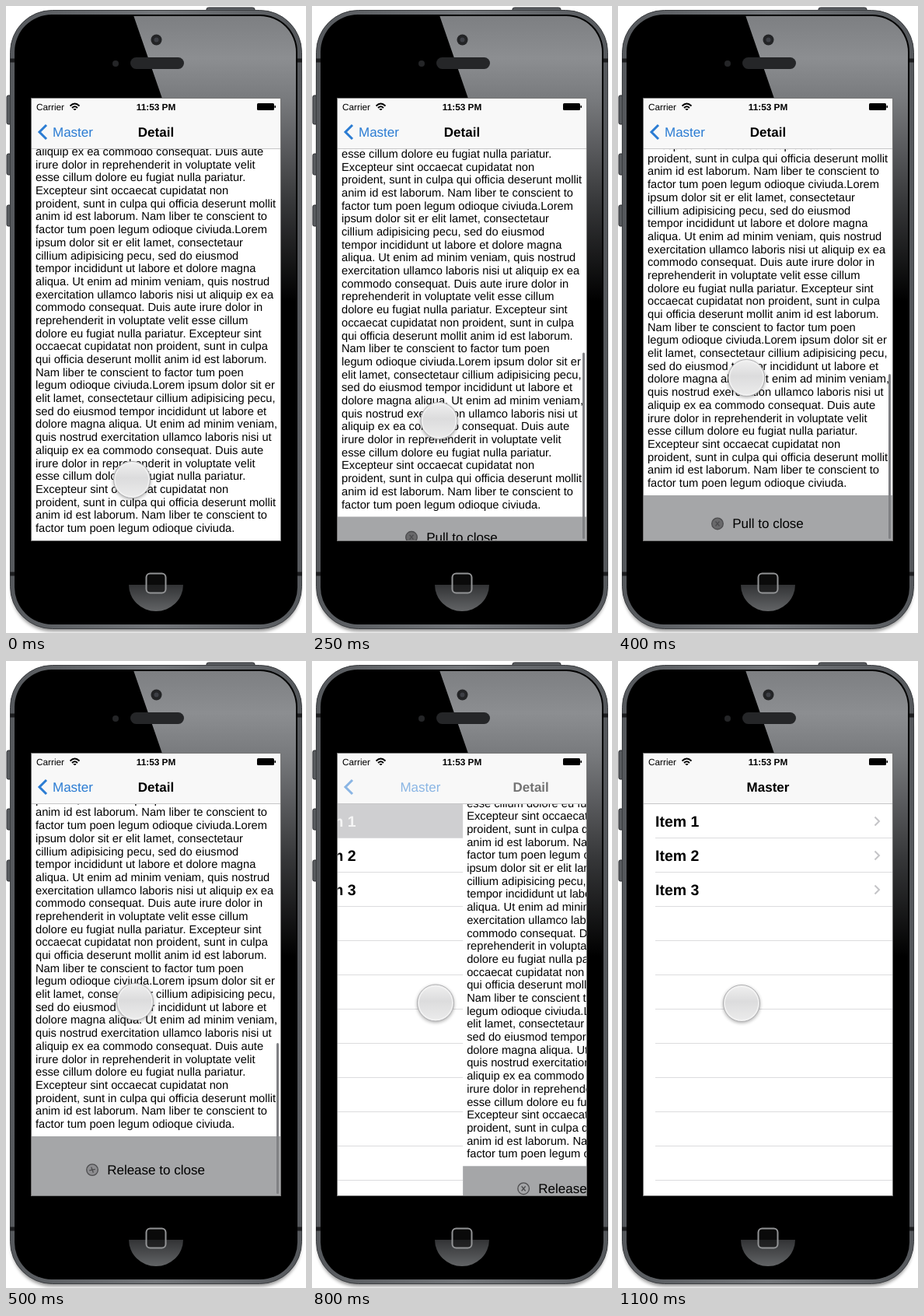
An HTML page that plays this animation: 386x806 px, repeating every 1.6 s.

```html
<!DOCTYPE html>
<html lang="en">
<head>
<meta charset="utf-8">
<title>Pull to close</title>
<style>
  html, body { margin: 0; width: 100%; height: 100%; overflow: hidden; background: #fff; }
  svg { display: block; width: 386px; height: 806px; }
  text { font: 17px "Liberation Sans", Arial, sans-serif; fill: #000; text-rendering: geometricPrecision; }
  .bold { font-weight: bold; }
  .status { font-size: 11.8px; }
  #lines text { font-size: 14.7px; }
  .mid { text-anchor: middle; }
  #rows text { font-size: 19.5px; font-weight: bold; }
  #back text { fill: #2b7cd3; }
</style>
</head>
<body>
<svg viewBox="0 0 386 806">
  <defs>
    <linearGradient id="rim" x1="0" x2="1" y1="0" y2="0">
      <stop offset="0" stop-color="#55585c"/><stop offset=".5" stop-color="#74777b"/><stop offset="1" stop-color="#55585c"/>
    </linearGradient>
    <linearGradient id="gloss" gradientUnits="userSpaceOnUse" x1="0" x2="0" y1="12" y2="380">
      <stop offset="0" stop-color="#7d7f82"/><stop offset=".15" stop-color="#8c8e91"/>
      <stop offset=".3" stop-color="#77797c"/><stop offset=".65" stop-color="#37383a"/><stop offset="1" stop-color="#000"/>
    </linearGradient>
    <linearGradient id="home" x1="0" x2="0" y1="0" y2="1">
      <stop offset="0" stop-color="#323335"/><stop offset="1" stop-color="#626466"/>
    </linearGradient>
    <linearGradient id="disc" x1="0" x2="0" y1="0" y2="1">
      <stop offset="0" stop-color="#f0f0f0"/><stop offset=".45" stop-color="#dcdcdd"/><stop offset="1" stop-color="#ececec"/>
    </linearGradient>
    <filter id="soft" x="-20%" y="-20%" width="140%" height="140%"><feGaussianBlur stdDeviation="2"/></filter>
    <clipPath id="face"><rect x="13" y="13" width="360" height="780" rx="46"/></clipPath>
    <clipPath id="screen"><rect x="33" y="119" width="320" height="568"/></clipPath>
  </defs>

  <!-- phone -->
  <g fill="#5b5e62" stroke="#2c2d30">
    <path d="M258 8V4q0-2 3-2h56q3 0 3 2v4z"/>
    <rect x="1" y="115" width="7" height="37" rx="2"/>
    <rect x="1" y="190" width="7" height="27" rx="2"/>
    <rect x="1" y="256" width="7" height="27" rx="2"/>
  </g>
  <rect x="7" y="40" width="372" height="764" rx="53" opacity=".4" filter="url(#soft)"/>
  <rect x="5.500" y="5.500" width="375" height="795" rx="54" fill="url(#rim)" stroke="#3b3d40"/>
  <path d="M5 70h7M374 70h7M5 730h7M374 730h7" stroke="#1c1d1f" stroke-width="5"/>
  <rect x="11" y="11" width="364" height="784" rx="48"/>
  <path clip-path="url(#face)" d="M164 12L201 119H353V400H374V12Z" fill="url(#gloss)"/>
  <circle cx="193.500" cy="43.500" r="7" fill="#232426"/>
  <circle cx="193.500" cy="43.500" r="3" fill="#3d3f45"/>
  <circle cx="141" cy="74" r="4" fill="#242527"/>
  <rect x="160" y="66" width="69" height="15" rx="7.500" fill="#252628"/>
  <path d="M158 744A35 34 0 0 0 228 744Z" fill="url(#home)"/>
  <rect x="180.500" y="729.500" width="25" height="25" rx="5" fill="#111" fill-opacity=".6" stroke="#929395" stroke-width="2"/>
  <rect x="32" y="118" width="322" height="570" fill="#777"/>

  <g clip-path="url(#screen)">
    <rect x="33" y="119" width="320" height="568" fill="#fff"/>
    <g id="master">
      <rect id="selected" x="33" y="184" width="320" height="43" fill="#cfcfd1"/>
      <g id="rows"></g>
    </g>
    <g id="detail">
      <rect x="33" y="119" width="320" height="568" fill="#fff"/>
      <g id="lines"></g>
      <rect id="band" x="33" width="320" height="80" fill="#a5a6a8"/>
      <g id="pull">
        <text id="label" class="mid" x="193" y="6"></text>
        <g id="icon" fill="none" stroke="#4b4b4d" stroke-width="1.300">
          <circle id="dot" r="7.300" fill="#69696b"/>
          <path id="cross" d="M-2.500-3L2.500 3M2.500-3L-2.500 3"/>
        </g>
      </g>
      <rect id="bar" x="348" width="3" rx="1.500" fill="#808184"/>
    </g>

    <!-- navigation and status bars -->
    <rect x="33" y="119" width="320" height="64" fill="#f8f8f8"/>
    <path d="M33 183.500H353" stroke="#c6c6c8"/>
    <g id="back">
      <path d="M52 153L43 162L52 171" fill="none" stroke="#2b7cd3" stroke-width="3"/>
      <text id="backLabel" x="60" y="168">Master</text>
    </g>
    <text id="detailTitle" class="bold mid" y="168">Detail</text>
    <text id="masterTitle" class="bold mid" y="168">Master</text>
    <text class="status" x="39" y="134">Carrier</text>
    <text class="status bold mid" x="193" y="134">11:53 PM</text>
    <g fill="none" stroke="#000" stroke-width="1.800">
      <path d="M82.500 128.500Q88.500 122.500 94.500 128.500M85 131Q88.500 127.500 92 131"/>
      <path d="M87 132.500h3L88.500 134z" fill="#000" stroke-width="1"/>
    </g>
    <rect x="323" y="125" width="22" height="9" rx="1.500"/>
    <rect x="345.500" y="128" width="1.500" height="3"/>
  </g>

  <g id="knob">
    <circle cy="1.500" r="24" opacity=".3" filter="url(#soft)"/>
    <circle r="23.500" fill="url(#disc)" stroke="#b0b0b2"/>
    <circle r="21.800" fill="none" stroke="#f6f6f6" stroke-opacity=".8" stroke-width="1.500"/>
  </g>
</svg>

<script>
const $ = id => document.getElementById(id);
const set = (id, attrs) => { for (const k in attrs) $(id).setAttribute(k, attrs[k]); };
const move = (id, x, y) => set(id, { transform: `translate(${x} ${y})` });
const clamp = v => Math.max(0, Math.min(1, v));

// Linear interpolation through [time, value] pairs
function track(t, ...keys) {
  const i = keys.findIndex(k => k[0] > t);
  if (i < 0) return keys[keys.length - 1][1];
  if (i === 0) return keys[0][1];
  const [t0, a] = keys[i - 1], [t1, b] = keys[i];
  return a + (b - a) * (t - t0) / (t1 - t0);
}

const copy = `aliquip ex ea commodo consequat. Duis aute
irure dolor in reprehenderit in voluptate velit
esse cillum dolore eu fugiat nulla pariatur.
Excepteur sint occaecat cupidatat non
proident, sunt in culpa qui officia deserunt mollit
anim id est laborum. Nam liber te conscient to
factor tum poen legum odioque civiuda.Lorem
ipsum dolor sit er elit lamet, consectetaur
cillium adipisicing pecu, sed do eiusmod
tempor incididunt ut labore et dolore magna
aliqua. Ut enim ad minim veniam, quis nostrud
exercitation ullamco laboris nisi ut aliquip ex ea
commodo consequat. Duis aute irure dolor in
reprehenderit in voluptate velit esse cillum
dolore eu fugiat nulla pariatur. Excepteur sint
occaecat cupidatat non proident, sunt in culpa
qui officia deserunt mollit anim id est laborum.
Nam liber te conscient to factor tum poen
legum odioque civiuda.Lorem ipsum dolor sit er
elit lamet, consectetaur cillium adipisicing pecu,
sed do eiusmod tempor incididunt ut labore et
dolore magna aliqua. Ut enim ad minim veniam,
quis nostrud exercitation ullamco laboris nisi ut`.split("\n");
const ending = [...copy.slice(0, 6), "factor tum poen legum odioque civiuda."];
$("lines").innerHTML = [...copy, ...ending]
  .map((s, i) => `<text x="38" y="${192 + i * 16.69}">${s}</text>`).join("");

for (let i = 0; i < 11; i++) {
  const y = 227.5 + i * 44;
  $("rows").innerHTML += `<path d="M48 ${y}H353" stroke="#dcdcde"/>` + (i < 3
    ? `<text x="48" y="${y - 15}">Item ${i + 1}</text>
       <path d="M330.500 ${y - 27}l5.500 5.500l-5.500 5.500" fill="none" stroke="#c4c4c7" stroke-width="2"/>` : "");
}
const firstItem = $("rows").querySelector("text");

function draw(t) {
  // Critically damped spring drives both the slide and the scroll's return
  const k = Math.max(0, t - 700) * 0.0169;
  const slide = t >= 1100 ? 1 : 1 - (1 + k) * Math.exp(-k);
  const scroll = track(t, [0, 0], [50, 2], [150, 12], [350, 49], [500, 76]) * (1 - slide);

  move("knob", track(t, [150, 162], [350, 165], [500, 166], [600, 166], [700, 159]),
    track(t, [0, 609], [50, 597], [150, 568], [350, 498], [500, 438], [600, 438], [700, 439], [900, 440]));

  move("detail", 320 * slide, 0);
  move("lines", 0, -scroll);
  set("band", { y: 687 - scroll });
  set("bar", { y: 415 + scroll, height: 270 - scroll, opacity: clamp(t / 100) });

  const ready = t >= 450;
  $("label").textContent = ready ? "Release to close" : "Pull to close";
  move("pull", 0, 702 - 0.63 * scroll);
  move("icon", ready ? 111 : 128, 0);
  set("dot", { "fill-opacity": track(t, [400, 1], [500, .4], [550, 0]) });
  set("cross", { transform: `rotate(${track(t, [400, -180], [550, 0])})` });

  const leave = clamp(1 - (t - 700) / 215);
  set("back", { opacity: leave });
  set("backLabel", { x: 60 + 106 * slide });
  set("detailTitle", { x: 193 + 176 * slide, opacity: leave });
  set("masterTitle", { x: 193 - 120 * (1 - slide), opacity: clamp((t - 875) / 200) });

  // The row highlight fades out once the list is in place
  const picked = track(t, [900, 1], [1100, 0]);
  const shade = Math.round(245 * picked);
  move("master", -96 * (1 - slide), 0);
  set("selected", { opacity: picked });
  firstItem.style.fill = `rgb(${shade},${shade},${shade})`;
}

const start = performance.now();
function tick() {
  const t = (performance.now() - start) % 1600;
  draw(Math.min(1100, Math.floor(t / 50) * 50));
  requestAnimationFrame(tick);
}
tick();
</script>
</body>
</html>
```
